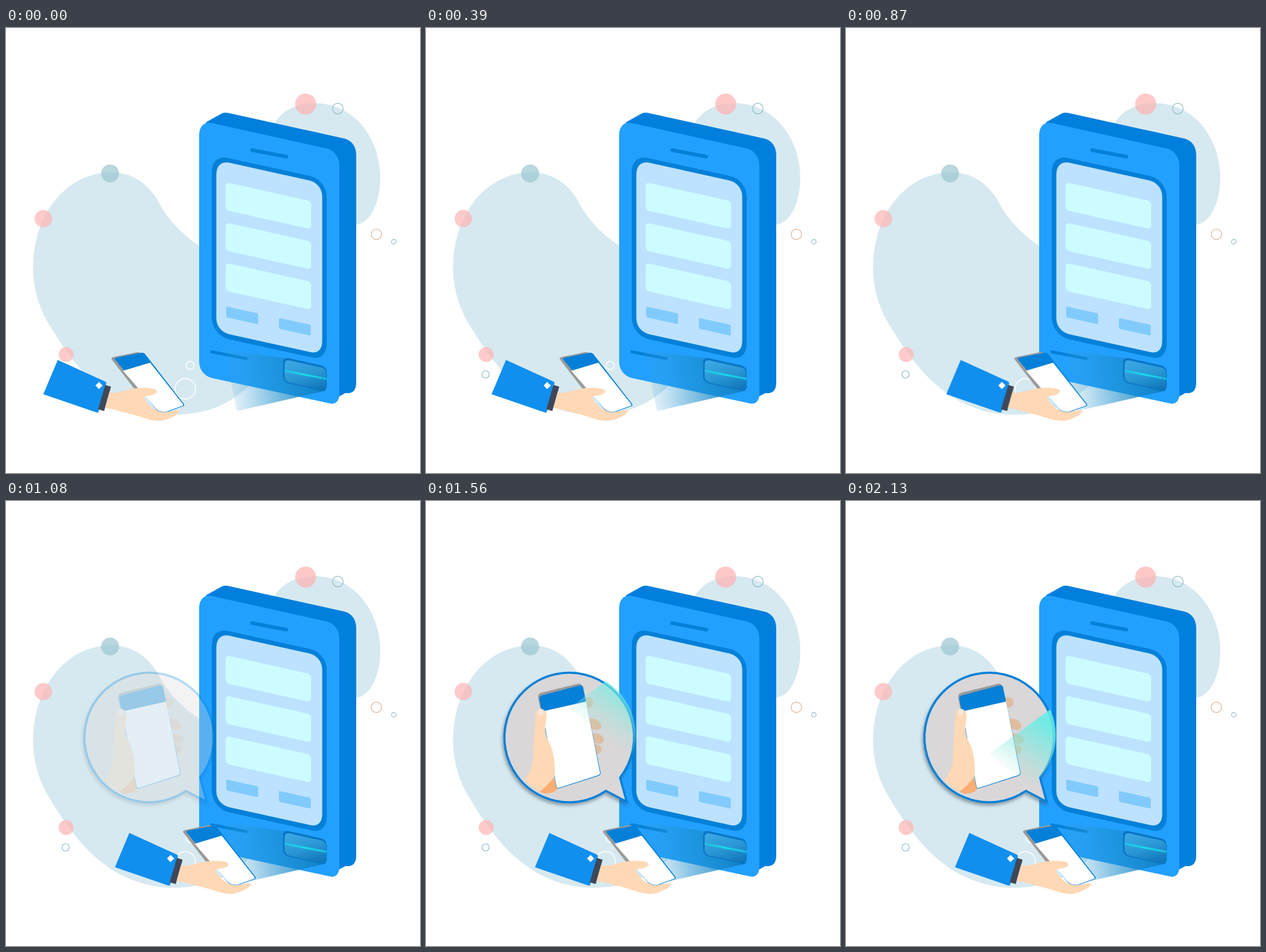
An HTML page without scripts that plays this animation: 688 by 740 pixels, repeating every 2160 ms.

```html
<!DOCTYPE html>
<html lang="en">
<head>
<meta charset="utf-8">
<title>Scan at the kiosk</title>
<style>
  html, body { margin: 0; width: 100%; height: 100%; overflow: hidden; background: #fff; }
  svg { display: block; width: 688px; height: 740px; }

  .hand, .bubble, .scan { animation: 2160ms -3ms infinite; }
  .hand { animation-name: reach; }
  .bubble { animation-name: appear; }
  .scan { animation-name: sweep; }

  @keyframes reach {
    0% { transform: none; animation-timing-function: steps(33); }
    45.8333%, 100% { transform: translateX(119px); }
  }
  @keyframes appear {
    0% { opacity: 0; animation-timing-function: step-end; }
    45.8333% { opacity: 0; animation-timing-function: steps(10); }
    59.7222%, 100% { opacity: 1; }
  }
  @keyframes sweep {
    0% { opacity: 0; transform: translateY(4.5px); animation-timing-function: step-end; }
    59.7222% { opacity: 1; transform: translateY(4.5px); animation-timing-function: steps(10); }
    73.6111% { opacity: 1; transform: translateY(-40.5px); animation-timing-function: steps(19); }
    100% { opacity: 1; transform: translateY(45px); }
  }

  .pale { fill: #d7e9f0; }
  .blue { fill: #0480d8; }
  .skin { fill: #ffd8b5; }
  .pink { fill: #ffb3b3; opacity: .7; }
  .ring { fill: none; stroke: #8fbccb; stroke-width: 1.2; }
  .light { stroke: #fff; stroke-width: 1.5; }
  .slot { stroke: #0480d8; stroke-linecap: round; }
</style>
</head>
<body>
<svg viewBox="0 0 688 740" xmlns="http://www.w3.org/2000/svg">
  <defs>
    <linearGradient id="ray" gradientUnits="userSpaceOnUse" x1="372" y1="600" x2="525" y2="580">
      <stop offset="0" stop-color="#3aa2d6" stop-opacity=".12"/>
      <stop offset=".4" stop-color="#1f90cc" stop-opacity=".5"/>
      <stop offset="1" stop-color="#1080c4"/>
    </linearGradient>
    <linearGradient id="glass" x1="0" y1="0" x2="1" y2="1">
      <stop offset="0" stop-color="#3eaae8"/>
      <stop offset=".5" stop-color="#2a97d4"/>
      <stop offset="1" stop-color="#0c70b4"/>
    </linearGradient>
    <linearGradient id="laser" gradientUnits="userSpaceOnUse" x1="462" y1="0" x2="533" y2="0">
      <stop offset="0" stop-color="#14e4ee" stop-opacity=".5"/>
      <stop offset=".5" stop-color="#12eaf0"/>
      <stop offset="1" stop-color="#14e4ee" stop-opacity=".6"/>
    </linearGradient>
    <linearGradient id="glow" gradientUnits="userSpaceOnUse" x1="335" y1="330" x2="275" y2="420">
      <stop offset="0" stop-color="#62ece6" stop-opacity=".88"/>
      <stop offset=".4" stop-color="#7cebe2" stop-opacity=".6"/>
      <stop offset="1" stop-color="#a8e8dc" stop-opacity="0"/>
    </linearGradient>
    <filter id="shade" x="-10%" y="-10%" width="120%" height="120%">
      <feDropShadow dx="-2" dy="4" stdDeviation="2.5" flood-color="#345" flood-opacity=".45"/>
    </filter>
    <clipPath id="lens"><circle cx="241.5" cy="390" r="107"/></clipPath>
    <rect id="card" width="142" height="46.5" rx="6"/>
    <rect id="key" width="53" height="18" rx="2"/>
  </defs>

  <!-- backdrop -->
  <path class="pale" d="M175 240C212 240 240 262 255 292C270 320 293 343 322 363L430 440V560L400 598C378 618 345 643 278 643C215 643 165 613 127 571C100 540 83 512 68 487C52 458 45 428 45 398C45 310 100 240 175 240Z"/>
  <path class="pale" d="M445 160C460 135 485 125 513 125C580 125 622 185 622 250C622 290 605 325 582 327L500 300Z"/>
  <circle class="pink" cx="498" cy="126.5" r="17.5"/>
  <circle class="pink" cx="62" cy="317" r="14.5"/>
  <circle class="pink" cx="100" cy="543" r="12.5"/>
  <circle cx="173" cy="242" r="15" fill="#9cc7d2" opacity=".72"/>
  <circle class="ring" cx="551.5" cy="134" r="8.8"/>
  <circle class="ring" cx="615.5" cy="343" r="8.7" style="stroke:#e0b394"/>
  <circle class="ring" cx="644.5" cy="355.5" r="3.8"/>
  <circle class="ring" cx="99" cy="576" r="6"/>
  <circle class="ring light" cx="306" cy="561" r="6.7"/>
  <circle class="ring light" cx="298" cy="600" r="17"/>

  <!-- kiosk -->
  <path fill="#007fdd" d="M332 157L357 143Q362 140 368 141L563 184C575 187 582 198 582 211V590C582 602 576 609 564 607L553 613L400 400Z"/>
  <path fill="#22a0ff" d="M321 178C321 163 330 155 342 158L532 200C545 203 554 214 554 229V608C554 620 548 627 537 624L342 582C330 579 321 568 321 555Z"/>
  <path class="slot" stroke-width="6" d="M409 203L466 214"/>
  <path class="blue" d="M342 240C342 222 352 213 368 216L505 246C522 250 533 265 533 282V523C533 542 524 551 509 548L372 518C354 514 342 499 342 480Z"/>
  <path fill="#bde2ff" d="M349.5 244C349.5 229 358 221.5 371 224L504 253.5C517 257 525.5 267 525.5 281V520C525.5 535 518 541.5 506 539L372 509.5C358 506 349.5 496 349.5 482Z"/>
  <g fill="#ccfcff">
    <use href="#card" transform="translate(365 256.5) skewY(12.5)"/>
    <use href="#card" transform="translate(365 323.5) skewY(12.5)"/>
    <use href="#card" transform="translate(365 390.5) skewY(12.5)"/>
  </g>
  <g fill="#81cbfc">
    <use href="#key" transform="translate(366 463) skewY(12.5)"/>
    <use href="#key" transform="translate(453.5 482) skewY(12.5)"/>
  </g>
  <path class="slot" stroke-width="5" d="M342 538.5L399 549.5"/>

  <!-- scanner -->
  <path fill="url(#ray)" d="M362 535L470 550L532 603L384 637Z"/>
  <rect width="72.5" height="42" rx="9" fill="#0a74c4" transform="translate(460.5 547) skewY(12.5)"/>
  <rect width="69" height="37" rx="8" fill="url(#glass)" transform="translate(463 551) skewY(12.5)"/>
  <path stroke="url(#laser)" stroke-width="5" opacity=".3" d="M463 570L533 583.5"/>
  <path stroke="url(#laser)" stroke-width="1.8" d="M463 570L533 583.5"/>

  <!-- reaching hand -->
  <g class="hand">
    <path fill="#9a9a9a" d="M175.500 551Q174 548 179 547L218 539Q222 538.500 224 541L230 600L214 601Z"/>
    <path class="blue" d="M181 551Q180 549 184 548L225 540Q229 539.500 231 542L295.500 625Q297.500 628 294 629L268 638.500Q258 641 250 635Z"/>
    <path fill="#fff" d="M194.500 570L239.500 556.500L294 625.500Q295.500 627.500 293 628.200L267 637.800Q258 640 250 634Z"/>
    <path fill="#118fee" d="M86 552L165 588Q167 589 166.500 591L154 638Q153 640 151 639.500L62 609Z"/>
    <path fill="#3f4858" d="M165 593.500L174.500 596.500L163 637L153 634Z"/>
    <path fill="#fff" d="M154.500 588.500L160.500 594.500L154.500 600.500L148.500 594.500Z"/>
    <path class="skin" d="M172 605C182 609 192 604 205 601C218 598 232 597 246 600C253 602 252 607 246 609C240 612 234 611 229 613C233 625 247 638 262 639C271 639 280 635 288 636C290 639 282 645 274 648C266 652 259 654 248 653C232 651 218 644 200 640C188 637 176 633 164.500 632Z"/>
  </g>

  <!-- close-up -->
  <g class="bubble">
    <path filter="url(#shade)" fill="#d9d7d8" stroke="#0680d7" stroke-width="3.6" d="M322.500 460A107.700 107.700 0 1 0 299 482L333.500 500Z"/>
    <g clip-path="url(#lens)">
      <g fill="#dfbd9f">
        <ellipse cx="269" cy="335" rx="9.500" ry="9"/>
        <ellipse cx="279" cy="371" rx="13" ry="8.500" transform="rotate(25 279 371)"/>
        <ellipse cx="284" cy="395" rx="12" ry="8" transform="rotate(20 284 395)"/>
        <ellipse cx="283" cy="413" rx="9" ry="8"/>
      </g>
      <path fill="#9a9a9a" d="M186.500 328Q185 321 191 319L252 304Q258 303 260 309L240 380L195 370Z"/>
      <path fill="#fbae74" d="M206 440L218 478L213 484Q200 488 182 487Z"/>
      <path class="blue" d="M188.500 330Q187.500 324.500 193 323L256 306.500Q260 306 261 309.500L290 451Q290.500 455.500 287 457L219 478.500Q217 479 216.500 476Z"/>
      <path fill="#fff" d="M193 350L266 333.500L289 451Q289.500 455 286 456L219 477.500Q217.500 478 217 475Z"/>
      <path class="skin" d="M182 362C180 350 186 344 193 346C199 348 201 354 200 362C197 378 196 388 203 398C212 415 215 432 214 457C206 469 195 479 185 486L155 475C172 455 177 445 178 425C179 400 180 380 182 362Z"/>
      <ellipse cx="190.500" cy="351.500" rx="4.500" ry="6" fill="#f6e7dc"/>
      <path class="scan" fill="url(#glow)" d="M238 380L345 302L420 330V530L335 460Z"/>
    </g>
  </g>
</svg>
</body>
</html>
```
